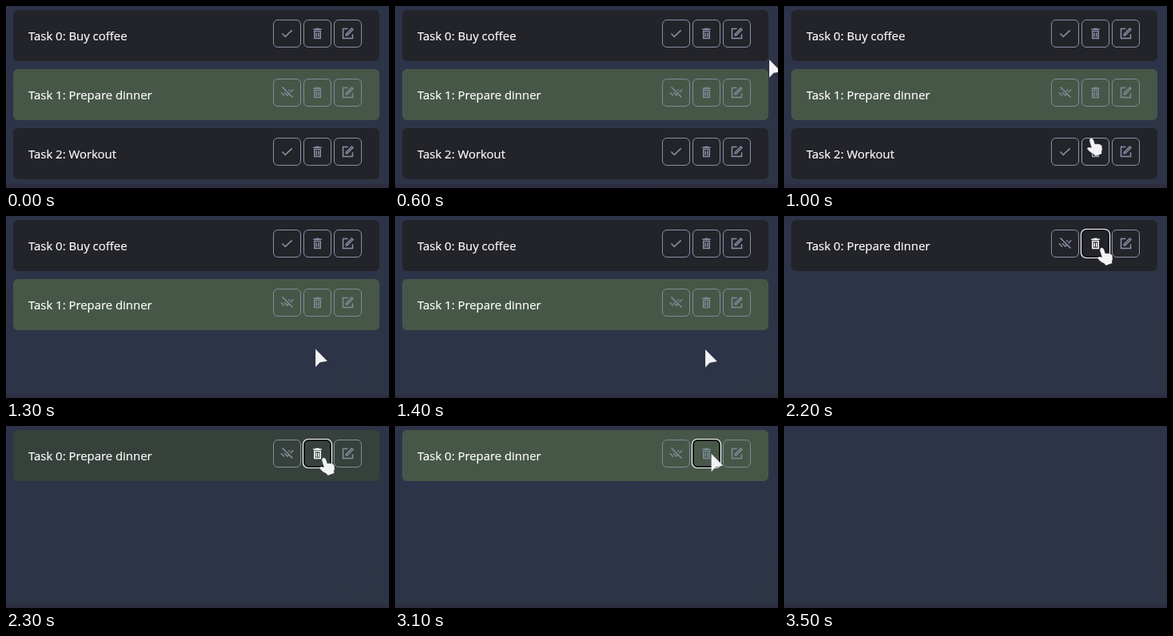
Recreate the animation shown at these times as an HTML page. Size 479x228 px, loop 4200 ms.

```html
<!DOCTYPE html>
<html lang="en">
<head>
<meta charset="utf-8">
<title>Task list</title>
<style>
  html, body { margin: 0; width: 100%; height: 100%; overflow: hidden; background: #2d3448; }
  svg { display: block; width: 479px; height: 228px; }
  text { font: 14.9px "Open Sans", "Noto Sans", sans-serif; fill: #fff; stroke: #fff; stroke-width: .2px; }
</style>
</head>
<body>
<svg viewBox="0 0 479 228">
  <defs>
    <linearGradient id="bg" x1="0" y1="0" x2="1" y2="1">
      <stop offset="0" stop-color="#2d344a"/>
      <stop offset="1" stop-color="#2d3446"/>
    </linearGradient>
  </defs>
  <rect width="479" height="228" fill="url(#bg)"/>
  <rect y="224" width="479" height="4" fill="#2e2c3f"/>
  <g id="rows"></g>
  <path id="cursor" fill="#f3f3f6" stroke="#24262e" stroke-opacity=".3" stroke-width=".6"/>
</svg>
<script>
const LOOP = 4200, STEP = 100, FADE = 100;
const BUTTON = 35, TOP = 12, ROW_GAP = 74;
const TOGGLE_X = 334, TRASH_X = 372, EDIT_X = 410;

// Line icons on a 24-unit grid
const ICONS = {
  check: 'M4 12l5 5.2L20.3 6.5',
  undo: 'M4 2.7L21.2 19.8M1.8 11.6l5.6 5.7M7.5 11.6l4.9 5 2.2-2.1M16.6 6.7l-2.1 2.1M22.3 6.7l-5 5',
  trash: 'M7 8v12h10V8zM5 5h14M9 4h6M10.2 10.5v7M13.8 10.5v7',
  edit: 'M12 4H4v16h16v-7M9 15v-2l9.6-9.6 2 2L11 15z'
};
const ARROW = 'M0 0V23L5.5 17 15 15.3Z';
const HAND = 'M-4 2.8Q-4 0-1.5-.2.6 0 1.4 2.6L2.8 7Q9 6 11.5 9 12.6 14 11 17L11.6 19 3.6 22 1.5 19.5Q-4 17.5-7 12.6-6.4 10-1.4 11.6Z';

const START = { x: 468, y: 67 };
const MOVES = [
  { from: 600, to: 1000, x: 386, y: 166 },
  { from: 1200, to: 1400, x: 388, y: 167 },
  { from: 1400, to: 2000, x: 399, y: 40 },
  { from: 2500, to: 3000, x: 395.5, y: 34.5 },
  { from: 3100, to: 3500, x: 384, y: 232 }
];

// When each row's trash is clicked and when the row is gone
const SWAP = 2200, RELEASE = 3000;
const CLICKED = [SWAP, Infinity, 1200];
const GONE = [3200, SWAP, 1300];

const DARK = [35, 36, 41], GREEN = [70, 87, 72];
const MUTED = [138, 143, 168], MUTED_DONE = [125, 139, 150], WHITE = [255, 255, 255];

const clamp = v => Math.min(1, Math.max(0, v));
const smooth = u => u * u * (3 - 2 * u);
const easeOut = u => 1 - (1 - u) ** 3;
const lerp = (a, b, k) => a + (b - a) * k;
const mix = (a, b, k) => a.map((v, i) => lerp(v, b[i], k));
const rgb = c => `rgb(${c.map(Math.round)})`;

function pointer(t) {
  return MOVES.reduce((p, m) => {
    const k = smooth(clamp((t - m.from) / (m.to - m.from)));
    return { x: lerp(p.x, m.x, k), y: lerp(p.y, m.y, k) };
  }, START);
}

function isOver(t, row, x) {
  if (t < MOVES[0].from || t >= Math.min(GONE[row], RELEASE)) return false;
  const p = pointer(t), dx = p.x - x, dy = p.y - (5 + ROW_GAP * row + TOP);
  return dx >= 0 && dx <= BUTTON && dy >= 0 && dy <= BUTTON;
}

// Share of the last moments spent over the button
function hoverLevel(t, row, x) {
  const samples = 8;
  let hits = 0;
  for (let i = 1; i <= samples; i++) hits += isOver(t - i * FADE / samples, row, x);
  return hits / samples;
}

function set(el, attrs) {
  for (const key in attrs) el.setAttribute(key, attrs[key]);
}

function add(parent, tag, attrs = {}) {
  const el = document.createElementNS('http://www.w3.org/2000/svg', tag);
  set(el, attrs);
  return parent.appendChild(el);
}

function addFrame(parent, inset, attrs) {
  const size = BUTTON - 2 * inset;
  return add(parent, 'rect', { x: inset, y: inset, width: size, height: size, rx: 6 - inset, ...attrs });
}

function makeButton(parent, x) {
  const g = add(parent, 'g', { transform: `translate(${x} ${TOP})`, fill: 'none' });
  addFrame(g, .5);
  add(g, 'path', { transform: 'translate(8.5 8.5) scale(.75)', 'stroke-width': 2 });
  return g;
}

function paint(button, icon, color) {
  button.setAttribute('stroke', rgb(color));
  button.querySelector('path').setAttribute('d', ICONS[icon]);
}

function makeRow(i) {
  const g = add(document.getElementById('rows'), 'g', { transform: `translate(0 ${5 + ROW_GAP * i})` });
  const card = add(g, 'rect', { x: 9, width: 458, height: 64, rx: 6 });
  const label = add(g, 'text', { x: 28, y: 38 });
  const [toggle, trash, edit] = [TOGGLE_X, TRASH_X, EDIT_X].map(x => makeButton(g, x));
  const ring = add(trash, 'g');
  addFrame(ring, 1, { stroke: '#0b0d0c', 'stroke-width': 2 });
  addFrame(ring, -.5, { stroke: '#fff', 'stroke-width': 1.2 });
  return { g, card, label, toggle, trash, edit, ring };
}

const rows = [0, 1, 2].map(makeRow);
const cursor = document.getElementById('cursor');

function drawRow(t, i, name, done, green) {
  const row = rows[i], shown = t < GONE[i];
  row.g.style.display = shown ? '' : 'none';
  const base = mix(MUTED, MUTED_DONE, green);
  const lit = x => mix(base, WHITE, hoverLevel(t, i, x));
  row.card.setAttribute('fill', rgb(mix(DARK, GREEN, green)));
  row.label.textContent = `Task ${i}: ${name}`;
  paint(row.toggle, done ? 'undo' : 'check', lit(TOGGLE_X));
  paint(row.trash, 'trash', lit(TRASH_X));
  paint(row.edit, 'edit', lit(EDIT_X));
  row.ring.style.display = t >= CLICKED[i] ? '' : 'none';
}

function render(time) {
  const t = Math.floor(time % LOOP / STEP) * STEP;
  const swapped = t >= SWAP;
  const green = easeOut(clamp((t - SWAP) / 400));

  drawRow(t, 0, swapped ? 'Prepare dinner' : 'Buy coffee', swapped, green);
  drawRow(t, 1, 'Prepare dinner', true, 1);
  drawRow(t, 2, 'Workout', false, 0);

  const { x, y } = pointer(t);
  const hand = rows.some((_, i) => [TOGGLE_X, TRASH_X, EDIT_X].some(bx => isOver(t, i, bx)));
  cursor.style.display = t >= MOVES[0].from && t < 3500 ? '' : 'none';
  set(cursor, { d: hand ? HAND : ARROW, transform: `translate(${x} ${y})` });
}

const origin = performance.now();
function tick() {
  render(performance.now() - origin);
  requestAnimationFrame(tick);
}
tick();
</script>
</body>
</html>
```
